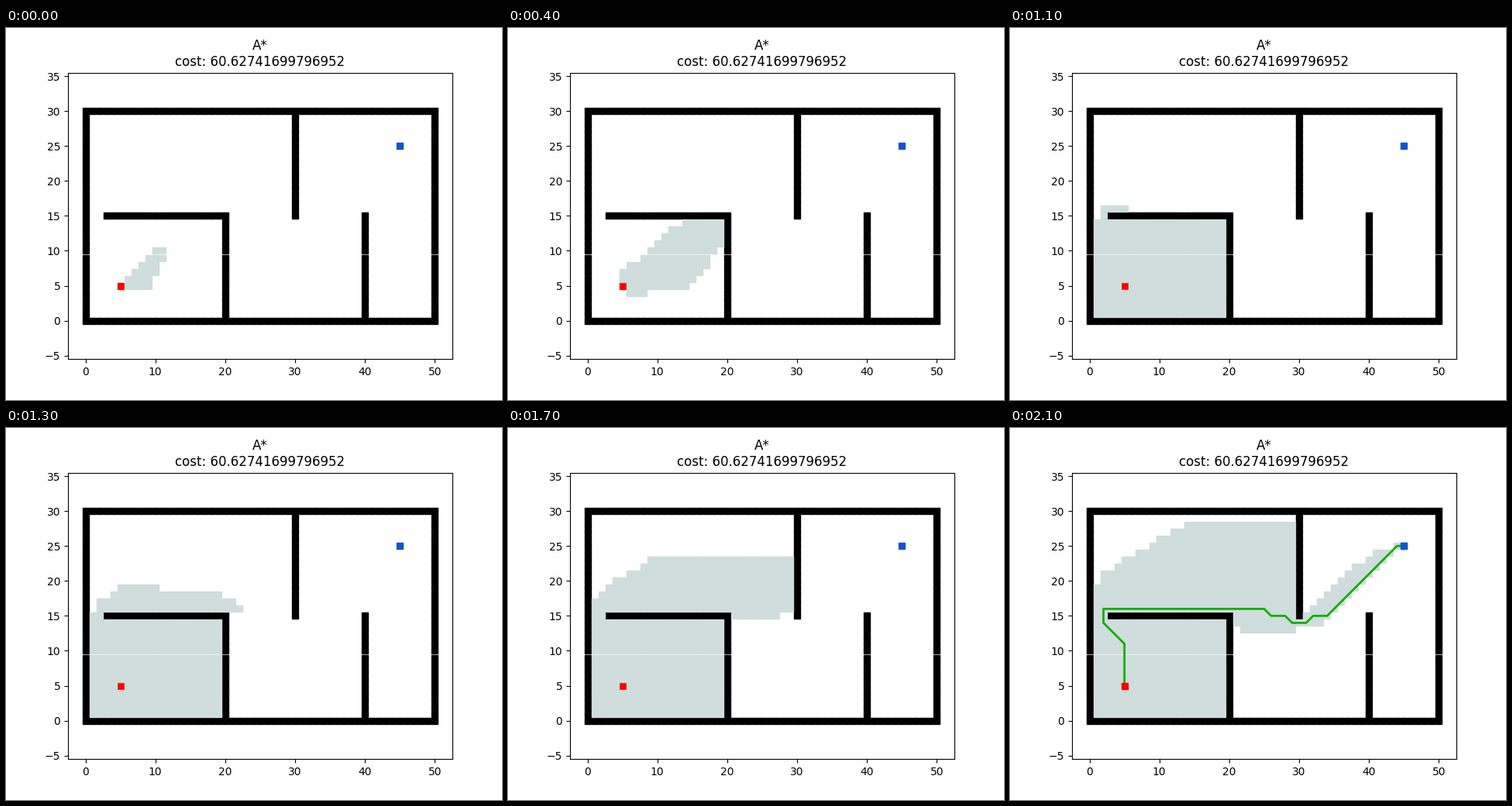
Recreate the animation shown at these times as a matplotlib script. Size 640 px wide and 480 px high, loop 2200 ms.

```python
import math
from itertools import product

import matplotlib.pyplot as plt
from matplotlib.animation import FuncAnimation

START, GOAL = (5, 5), (45, 25)
WIDTH, HEIGHT = 51, 31
COST = "60.62741699796952"
ROUTE = [(5, 5), (5, 11), (2, 14), (2, 16), (25, 16), (26, 15), (28, 15),
         (29, 14), (31, 14), (32, 15), (34, 15), (44, 25), (45, 25)]
MOVES = [m for m in product((-1, 0, 1), repeat=2) if m != (0, 0)]


def build_walls():
    walls = {(x, y) for x in range(WIDTH) for y in (0, HEIGHT - 1)}
    walls |= {(x, y) for x in (0, WIDTH - 1) for y in range(HEIGHT)}
    walls |= {(x, 15) for x in range(3, 21)}
    walls |= {(20, y) for y in range(15)}
    walls |= {(30, y) for y in range(15, 30)}
    walls |= {(40, y) for y in range(16)}
    return walls


def neighbors(cell, walls):
    """Free cells around, without cutting wall corners."""
    x, y = cell
    for dx, dy in MOVES:
        if not walls & {(x + dx, y + dy), (x + dx, y), (x, y + dy)}:
            yield (x + dx, y + dy), math.sqrt(2) if dx and dy else 1


def search(walls):
    """Cells in the order A* closes them, without start and goal."""
    def rank(cell):
        h = math.dist(cell, GOAL)
        return frontier[cell] + h, h

    frontier, closed = {START: 0}, {}
    while frontier:
        cell = min(frontier, key=rank)
        g = closed[cell] = frontier.pop(cell)
        if cell == GOAL:
            break
        for nxt, step in neighbors(cell, walls):
            if nxt not in closed:
                frontier[nxt] = min(g + step, frontier.get(nxt, math.inf))
    return [c for c in closed if c not in (START, GOAL)]


walls = build_walls()
visited = search(walls)

# The search is shown in growing batches, then complete with its route.
counts = [*range(20, 201, 20), *range(240, 391, 30), *range(440, 601, 40),
          len(visited)]

fig, ax = plt.subplots(figsize=(6.4, 4.8), dpi=100)


def draw_ends():
    return [ax.plot(*cell, marker="s", color=color)[0]
            for cell, color in ((START, "#ff0000"), (GOAL, "#1155cc"))]


draw_ends()
ax.plot(*zip(*sorted(walls)), "sk")
ax.set_title("A*\ncost: " + COST)
ax.axis("equal")
ax.set_xlim(ax.get_xlim())
ax.set_ylim(ax.get_ylim())

area, = ax.plot([], [], "s", color="#cfdddc")
route, = ax.plot(*zip(*ROUTE), color="#13ae00", linewidth=2)
finish = [route, *draw_ends()]


def update(i):
    area.set_data(*zip(*visited[:counts[i]]))
    for artist in finish:
        artist.set_visible(i == len(counts) - 1)
    return [area, *finish]


anim = FuncAnimation(fig, update, frames=len(counts), interval=100,
                     repeat=True, repeat_delay=0)
plt.show()
```
